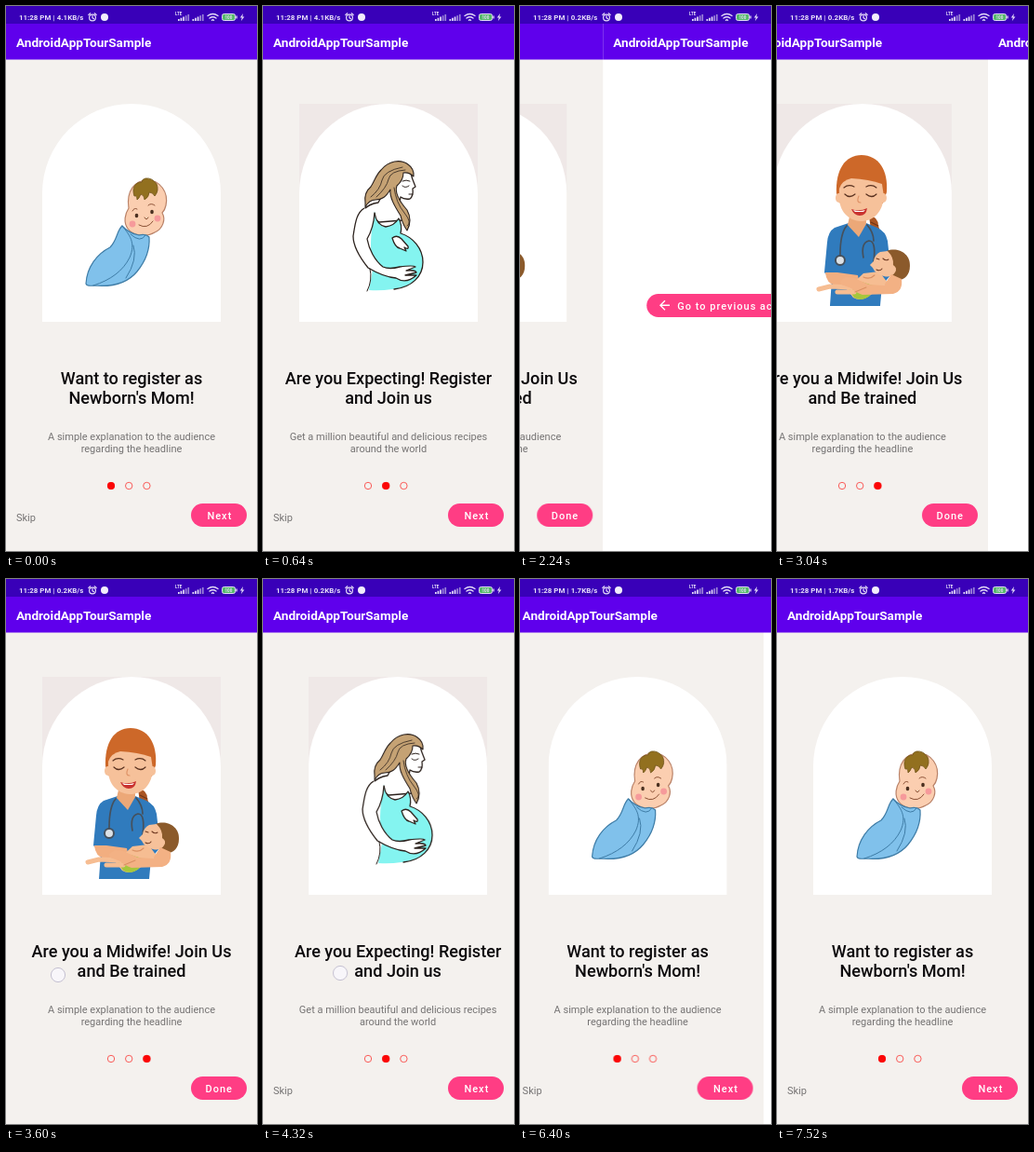
An HTML page that plays this animation: 270x585 px, repeating every 7.6 s.

```html
<!DOCTYPE html>
<html lang="en">
<head>
<meta charset="utf-8">
<title>App tour</title>
<style>
html, body { margin: 0; height: 100%; overflow: hidden; background: #f4f1ee; }
svg { display: block; width: 100vw; height: 100vh; }
text { font-family: Roboto, sans-serif; }
.bar { fill: #5f00ec; }
.title { font-size: 13.6px; font-weight: 700; fill: #fff; }
.head { font-size: 18.1px; font-weight: 500; fill: #0c0a0c; text-anchor: middle; }
.body { font-size: 11px; fill: #757373; text-anchor: middle; }
.btn rect { fill: #ff3d84; }
.btn text { font-size: 11px; font-weight: 500; letter-spacing: 1px; fill: #fff; }
.status text { font-size: 7.9px; font-weight: 700; fill: #e9e1fa; }
.status .tiny { font-size: 4.5px; }
.line { fill: none; stroke-linecap: round; stroke-linejoin: round; }

.anim { animation: 7600ms infinite linear; }
.step { animation-timing-function: step-end; }
.activities { animation-name: activities; }
.pager { animation-name: pager; }
.dot { animation-name: dot; }
.next { animation-name: next; }
.done { animation-name: done; }
.touch { animation-name: touch-show; }
.finger { animation-name: touch-move; }
.speed-a { animation-name: speed-a; }
.speed-b { animation-name: speed-b; }
.speed-c { animation-name: speed-c; }

@keyframes activities {
  0%, 42.5%, 85.66%, 100% { transform: translateX(0); }
  28.053%, 71.474% { transform: translateX(0); animation-timing-function: cubic-bezier(.333, 1, .667, 1); }
  32.658%, 76.08% { transform: translateX(-270px); }
  37.89%, 81.05% { transform: translateX(-270px); animation-timing-function: cubic-bezier(.333, 1, .667, 1); }
}
@keyframes pager {
  0% { transform: translateX(0); }
  3.68% { transform: translateX(0); animation-timing-function: cubic-bezier(.333, 1, .667, 1); }
  8.16% { transform: translateX(-270px); }
  12.1% { transform: translateX(-270px); animation-timing-function: cubic-bezier(.333, 1, .667, 1); }
  16.3%, 47.63% { transform: translateX(-540px); }
  50.53% { transform: translateX(-420px); animation-timing-function: cubic-bezier(.333, 1, .667, 1); }
  53.68%, 56.45% { transform: translateX(-270px); }
  56.84% { transform: translateX(-260px); }
  60% { transform: translateX(-138px); animation-timing-function: cubic-bezier(.333, 1, .667, 1); }
  63.16%, 100% { transform: translateX(0); }
}
@keyframes dot {
  0%, 60.13%, 100% { transform: translateX(0); }
  3.95%, 50.66% { transform: translateX(19.2px); }
  12.1% { transform: translateX(38.4px); }
}
@keyframes next { 0%, 50.66%, 100% { opacity: 1; } 12.1% { opacity: 0; } }
@keyframes done { 0%, 50.66%, 100% { opacity: 0; } 12.1% { opacity: 1; } }
@keyframes touch-show {
  0%, 3.4%, 11.9%, 27.4%, 37.4%, 50.6%, 60.1%, 71%, 80.6%, 100% { opacity: 0; }
  1.6%, 10.3%, 25.3%, 35.78%, 46.3%, 56.5%, 69%, 78.94% { opacity: 1; }
}
@keyframes touch-move {
  0%, 27.5% { transform: translate(231px, 547px); }
  35%, 37.5% { transform: translate(135px, 322px); }
  46%, 47.63% { transform: translate(56px, 425px); }
  50.53% { transform: translate(176px, 420px); }
  56.45% { transform: translate(73px, 423px); }
  56.84% { transform: translate(83px, 423px); }
  60% { transform: translate(205px, 417px); }
  69%, 71% { transform: translate(22px, 549px); }
  78.9%, 100% { transform: translate(135px, 322px); }
}
@keyframes speed-a { 0% { opacity: 1; } 24.2%, 100% { opacity: 0; } }
@keyframes speed-b { 0%, 84.2%, 100% { opacity: 0; } 24.2% { opacity: 1; } }
@keyframes speed-c { 0% { opacity: 0; } 84.2%, 100% { opacity: 1; } }
</style>
</head>
<body>
<svg viewBox="0 0 270 585">
  <defs>
    <path id="arch" fill="#fff" d="M39 339V201a96 96 0 0 1 192 0V339z"/>
    <rect id="frame" x="39" y="105" width="192" height="234" fill="#efe8e7"/>
    <g id="appbar">
      <rect class="bar" y="19" width="270.5" height="38.5"/>
      <text class="title" x="11" y="43.8">AndroidAppTourSample</text>
    </g>
    <g id="bars">
      <path d="M0 16v-2h1.7v2zM2.6 16v-3.2h1.7V16zM5.2 16v-4.5h1.7V16z" fill="#e4daf8"/>
      <path d="M7.8 16v-5.8h1.7V16zM10.4 16V9h1.7v7z" fill="#9c84d8"/>
    </g>
  </defs>

  <g class="anim activities">
    <rect width="270" height="585" fill="#f4f1ee"/>
    <g class="anim pager">
      <g>
        <use href="#arch"/>
        <!-- swaddled baby -->
        <g stroke-width="1.2" stroke-linejoin="round">
          <path d="M132 217C129 198 139 187 152 187C166 187 175 200 172 214Q171 219 168 222C172 229 169 239 160 243C150 249 136 246 131 239C126 232 128 223 132 217z" fill="#fbceb0" stroke="#b98268"/>
          <path d="M138 204C135 195 139 189 146 189Q146 186 150 185Q157 184 162 191Q165 198 160 204Q158 200 154 200Q154 205 149 208Q149 203 145 202Q143 207 141 208Q141 203 138 204z" fill="#92701f" stroke="#6f5418" stroke-width=".8"/>
          <path d="M125 236C119 241 120 251 112 259C98 266 87 280 86 298Q87 301 94 300C114 302 131 297 141 285C150 274 155 262 154 248Q150 244 143 246Q132 244 125 236z" fill="#80c1eb" stroke="#3e7ca6"/>
          <path class="line" d="M125 236C133 246 140 254 133 270C126 284 113 294 94 300M134 245Q145 255 150 246M137 257Q142 272 129 292" stroke="#3e7ca6" stroke-width="1"/>
          <g fill="#f69a9b" stroke="none"><circle cx="136" cy="234" r="3.4"/><circle cx="163" cy="228" r="3.4"/></g>
          <g fill="#4b3020" stroke="none"><ellipse cx="140.5" cy="225" rx="1.8" ry="2.3"/><ellipse cx="157" cy="221" rx="1.8" ry="2.3"/></g>
          <path class="line" d="M143 235Q152 240 158 231M149 227Q151 231 153 227M136 220Q138 216 141 218M153 214Q156 211 160 214" stroke="#8c5236" stroke-width="1"/>
        </g>
        <text class="head" x="135" y="405.5">Want to register as</text>
        <text class="head" x="135" y="427">Newborn's Mom!</text>
        <text class="body" x="135" y="465.5">A simple explanation to the audience</text>
        <text class="body" x="135" y="478.5">regarding the headline</text>
      </g>

      <g transform="translate(270)">
        <use href="#frame"/><use href="#arch"/>
        <!-- expecting mother -->
        <g transform="translate(-10)" stroke="#2b211c" stroke-width="1.3" stroke-linejoin="round">
          <path d="M157 176L168 176Q170 185 174 194L171 196Q172 204 168 207Q162 208 158 205L156 217L160 230L135 232L117 220Q124 212 134 211L145 190z" fill="#fff"/>
          <path d="M130 220Q130 232 139 237Q150 237 156 228Q160 235 158 244C171 248 182 260 182 274C182 291 169 303 149 304Q136 306 124 305C126 292 130 283 127 270Q124 252 130 220z" fill="#84f4f0" stroke="none"/>
          <path d="M120 211C119 204 120 199 126 194C130 188 131 182 137 176C145 166 158 164 166 170Q173 175 172 183Q167 178 161 179Q161 187 154 193C151 201 158 211 165 219Q171 230 165 241Q160 234 158 225C151 214 146 205 147 197C142 205 138 208 131 208Q124 208 120 216z" fill="#c5a274" stroke-width="1.1"/>
          <path class="line" d="M126 205Q136 197 138 187T160 173M132 205Q143 195 145 186T163 176M151 195Q153 211 162 222T165 236" stroke-width=".8"/>
          <path class="line" d="M130 222Q132 235 142 237Q151 236 156 228Q160 235 158 244C171 248 182 260 182 275C182 290 170 302 151 304"/>
          <path d="M119 217C110 222 109 235 107 247C107 258 115 271 123 281Q140 291 153 292Q164 299 175 289L163 289L175 286Q174 283 164 284L174 280Q172 278 157 280Q146 283 139 280C130 273 124 261 122 250Q129 238 130 222" fill="#fff"/>
          <path d="M149 249Q154 245 159 250L166 258Q167 262 162 259L164 263L157 260Q152 259 149 249z" fill="#fff"/>
          <path class="line" d="M160 193Q163 196 167 193M160 188Q164 186 168 188M167 202H171M125 282Q128 294 122 306" stroke-width="1"/>
        </g>
        <text class="head" x="135" y="405.5">Are you Expecting! Register</text>
        <text class="head" x="135" y="427">and Join us</text>
        <text class="body" x="135" y="465.5">Get a million beautiful and delicious recipes</text>
        <text class="body" x="135" y="478.5">around the world</text>
      </g>

      <g transform="translate(540)">
        <use href="#frame"/><use href="#arch"/>
        <!-- nurse holding a baby -->
        <path d="M142 225Q152 226 152 236L155 244Q153 253 148 257Q143 247 144 240z" fill="#a95422"/>
        <path class="line" d="M144 232L152 236M145 240L154 243" stroke="#713515" stroke-width="1.1"/>
        <path d="M120 233L105 238Q98 242 97 254L94 286L102 294L100 322H154L156 300L166 288L162 252Q160 242 151 238L139 233z" fill="#307bbd"/>
        <path d="M122 222H139V234L131 248L119 235z" fill="#eca878"/>
        <path d="M107 201C106 176 116 160 134 160C152 160 163 176 161 200L157 212H111z" fill="#cd6829"/>
        <g fill="#f6c19a">
          <ellipse cx="109.5" cy="206" rx="3.5" ry="5"/><ellipse cx="157.5" cy="206" rx="3.5" ry="5"/>
          <path d="M110 196Q113 187 123 185Q142 186 156 191L158 204C157 221 147 231 133 231C119 230 110 220 110 205z"/>
        </g>
        <path class="line" d="M116 202Q121 207 127 202M139 202Q145 207 150 202M115 195Q120 191 126 194M139 194Q145 191 150 195" stroke="#59311f" stroke-width="1.2"/>
        <path class="line" d="M131 204Q128 211 133 211" stroke="#df9468" stroke-width="1.2"/>
        <path d="M123 218Q132 221 140 217Q139 225 132 225Q126 225 123 218z" fill="#c9322f"/>
        <path d="M125 219Q132 221 138 219L136 221H127z" fill="#fff"/>
        <path class="line" d="M118 236Q111 244 111 267M140 235Q147 243 147 252M136 270Q133 254 142 252Q150 252 147 275" stroke="#45505c" stroke-width="1.7"/>
        <circle cx="111" cy="273" r="5" fill="#dbe1e6" stroke="#45505c" stroke-width="2"/>
        <path d="M95 286Q96 298 106 300L132 299L130 289L108 286z" fill="#f2ae80"/>
        <path d="M136 287L153 285L162 297L144 310Q134 318 125 313L118 304z" fill="#f6bd92"/>
        <path d="M134 296L146 300L143 311Q134 318 126 313L120 304z" fill="#a6c63c"/>
        <path class="line" d="M124 302L100 301L88 304M126 307L108 307" stroke="#f6bd92" stroke-width="5"/>
        <path d="M161 263C173 258 187 266 186 279C186 291 177 297 166 293z" fill="#8b5a2b"/>
        <path d="M162 263Q169 270 168 278Q173 281 170 286Q166 292 158 290Q149 288 146 281L143 278L147 274Q148 267 154 264z" fill="#f6c19a"/>
        <path class="line" d="M150 271L153 272M157 271Q160 274 163 272M150 283Q154 285 156 282" stroke="#713b23" stroke-width="1.1"/>
        <path d="M166 288L177 293Q179 306 168 309L135 310Q127 307 123 303L112 299L111 295L117 291L126 292L142 299L158 300z" fill="#f3b184"/>
        <path class="line" d="M139 302L127 307M148 289Q143 294 136 291" stroke="#d98f63" stroke-width="1.1"/>
        <text class="head" x="135" y="405.5">Are you a Midwife! Join Us</text>
        <text class="head" x="135" y="427">and Be trained</text>
        <text class="body" x="135" y="465.5">A simple explanation to the audience</text>
        <text class="body" x="135" y="478.5">regarding the headline</text>
      </g>
    </g>

    <g fill="none" stroke="#fa4b48" stroke-width=".9">
      <circle cx="113" cy="515" r="3.7"/><circle cx="132.2" cy="515" r="3.7"/><circle cx="151.4" cy="515" r="3.7"/>
    </g>
    <circle class="anim step dot" cx="113" cy="515" r="4" fill="#fb0606"/>
    <g class="btn">
      <rect x="199" y="534" width="60" height="25" rx="12.5"/>
      <text class="anim step next" x="216.4" y="550.8">Next</text>
      <text class="anim step done" x="214.5" y="550.8">Done</text>
    </g>
    <text class="body anim step next" x="21.5" y="552.8">Skip</text>
    <use href="#appbar"/>

    <g transform="translate(270)">
      <rect width="270" height="585" fill="#fff"/>
      <use href="#appbar"/>
      <g class="btn">
        <rect x="47" y="309" width="176" height="25" rx="12.5"/>
        <path transform="translate(58 313) scale(.6875)" fill="#fff" d="M20 11H7.83l5.59-5.59L12 4l-8 8 8 8 1.41-1.41L7.83 13H20z"/>
        <text x="80" y="325.5">Go to previous activity</text>
      </g>
    </g>
  </g>

  <g class="status">
    <rect width="270" height="19" fill="#3900b8"/>
    <text x="14" y="15">11:28 PM |</text>
    <text class="anim step speed-a" x="54.8" y="15">4.1KB/s</text>
    <text class="anim step speed-b" x="54.8" y="15">0.2KB/s</text>
    <text class="anim step speed-c" x="54.8" y="15">1.7KB/s</text>
    <g class="line" stroke="#e4daf8" stroke-width="1.2">
      <circle cx="93" cy="12.5" r="3.4"/>
      <path d="M93 10.5v2.2l1.5 1M88.8 9.5l2-1.7M97.2 9.5l-2-1.7"/>
      <path d="M217 10.5q5.5-4 11 0M219 13q3.5-2.5 7 0M221.5 15.2q1-.8 2 0" stroke-width="1.4"/>
    </g>
    <circle cx="106" cy="12" r="4" fill="#f2edfc"/>
    <text class="tiny" x="182" y="9.5">LTE</text>
    <use href="#bars" x="185"/><use href="#bars" x="200.5"/>
    <rect x="232.5" y="8.5" width="14" height="7" rx="2" fill="#55b96a" stroke="#e4daf8"/>
    <path d="M248 10.5v3" stroke="#e4daf8" stroke-width="1.4"/>
    <text class="tiny" x="235.5" y="13.7">100</text>
    <path d="M255 8l-3.2 4.6h2l-1 3.6 3.6-4.8h-2.1z" fill="#e4daf8"/>
  </g>

  <g class="anim step touch">
    <circle class="anim finger" r="7.6" fill="#f8f7fb" fill-opacity=".85" stroke="#c3bfd0"/>
  </g>
</svg>
<script>
// Hold each pose for 80 ms, like a 12.5 fps screen recording.
const FRAME = 80, LOOP = 7600;
const animations = document.getAnimations();
const start = performance.now();
animations.forEach(a => a.pause());

function draw() {
  const elapsed = (performance.now() - start) % LOOP;
  const time = Math.floor(elapsed / FRAME) * FRAME;
  animations.forEach(a => { a.currentTime = time; });
  requestAnimationFrame(draw);
}
draw();
</script>
</body>
</html>
```
